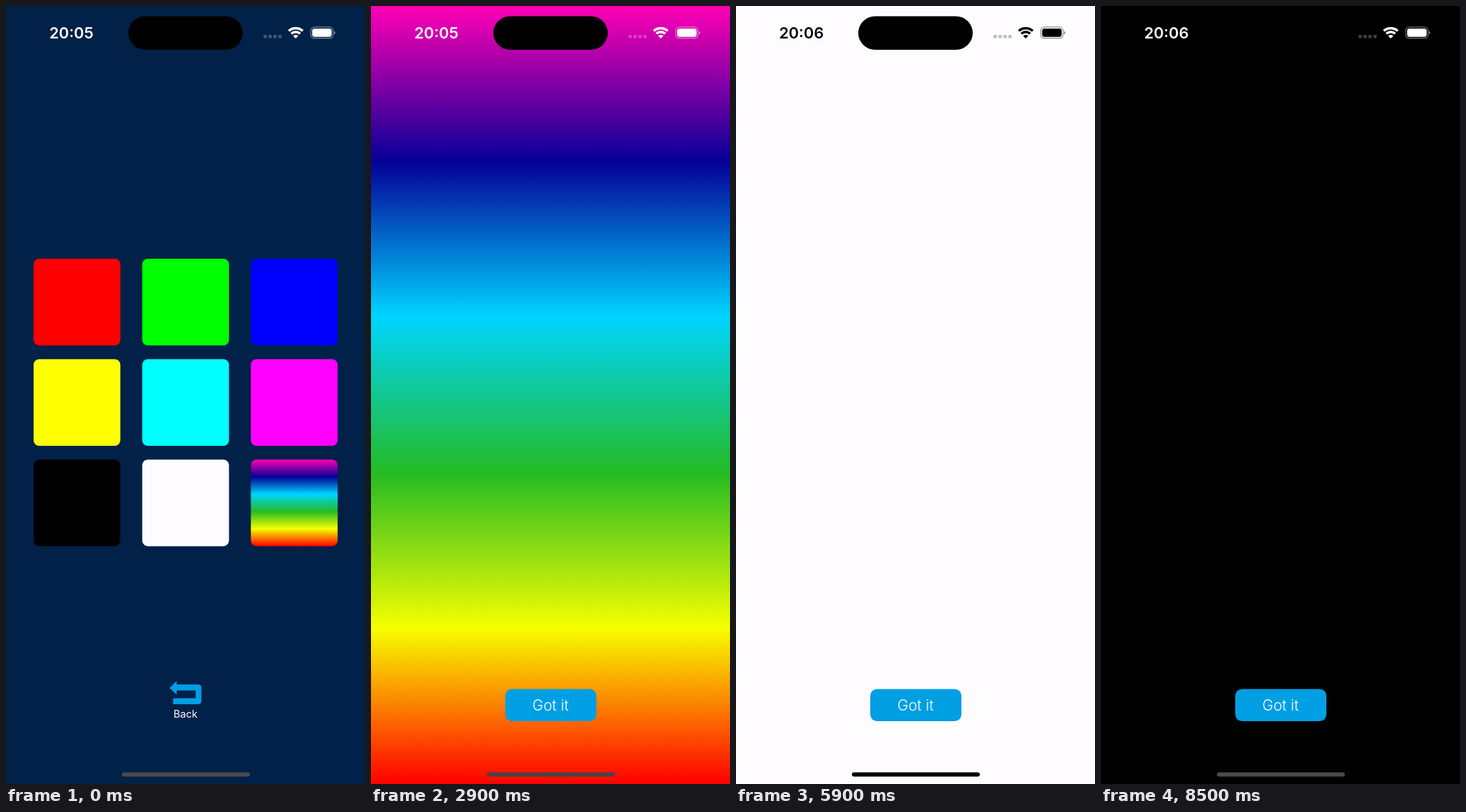
Recreate the animation shown at these times as an HTML page. Size 508 px wide and 1102 px high, loop 8.6 s.

```html
<!DOCTYPE html>
<html lang="en">
<head>
<meta charset="utf-8">
<title>Color screens</title>
<style>
  html, body { margin: 0; width: 100%; height: 100%; overflow: hidden; background: #022148; }
  svg { display: block; width: 100%; height: 100%; }
  text { font-family: Inter, sans-serif; text-anchor: middle; }
</style>
</head>
<body>
<svg viewBox="0 0 508 1102">
  <defs>
    <linearGradient id="rainbow" x1="0" y1="0" x2="0" y2="1">
      <stop offset="0" stop-color="#ff00b4"/>
      <stop offset=".2" stop-color="#050096"/>
      <stop offset=".4" stop-color="#00d5ff"/>
      <stop offset=".6" stop-color="#24bb24"/>
      <stop offset=".8" stop-color="#f7ff00"/>
      <stop offset="1" stop-color="#ff0000"/>
    </linearGradient>
  </defs>

  <rect width="508" height="1102" fill="#022148"/>
  <g id="tiles"></g>
  <path fill="#009fe3" d="M231.5 966 241.5 956V961H271.5Q276.5 961 276.5 966V984Q276.5 989 271.5 989H236.5V980.5H268.5V969.5H241.5V975.5Z"/>
  <text x="254" y="1008" font-size="14.6" fill="#fff">Back</text>

  <g id="sheet">
    <rect id="cover" width="508" height="1102"/>
    <rect x="190" y="967.5" width="129" height="45.5" rx="9.5" fill="#009fe3"/>
    <text x="254" y="998" font-size="21" font-weight="300" fill="#fff">Got it</text>
  </g>

  <rect x="173" y="14.5" width="162" height="47.5" rx="23.75"/>
  <g id="status">
    <text id="clock" x="92.5" y="46" font-size="21.8" font-weight="600"></text>
    <path opacity=".25" d="M364.5 41h4.4v4.4h-4.4zm7 0h4.4v4.4h-4.4zm7 0h4.4v4.4h-4.4zm7 0h4.4v4.4h-4.4z"/>
    <g id="wifi" fill="none" stroke-width="3.5">
      <path d="M400.1 35.3A14.6 14.6 0 0 1 419.9 35.3M403.8 39.3A9.1 9.1 0 0 1 416.2 39.3"/>
    </g>
    <path d="M410 46 406.4 42.4A5.1 5.1 0 0 1 413.6 42.4Z"/>
    <rect id="battery" x="431.2" y="29.9" width="31.6" height="15.8" rx="5" fill="none" stroke-width="1.2" opacity=".45"/>
    <rect x="433.2" y="31.9" width="27.6" height="11.8" rx="3.4"/>
    <path opacity=".5" d="M464.2 35.4Q466 36 466 37.8T464.2 40.2Z"/>
  </g>
  <rect id="home" x="164" y="1085.5" width="181" height="6" rx="3"/>
</svg>
<script>
const LOOP = 8600, STEP = 100, HEIGHT = 1102;
const GRID_HOME = '#4a4a4a';
const byId = id => document.getElementById(id);
const set = (id, attributes) => {
  for (const name in attributes) byId(id).setAttribute(name, attributes[name]);
};

const screens = [
  { fill: 'url(#rainbow)', show: 2320, hide: 3850, hideTime: 140,
    home: y => y > 350 ? '#1b1b1b' : '#454545' },
  { fill: '#fefcff', show: 4680, hide: 5950, hideTime: 350, home: () => '#000' },
  { fill: '#000', show: 7050, hide: LOOP, hideTime: 1, home: () => GRID_HOME }
];

const tileFills = ['red', 'lime', 'blue', 'yellow', 'cyan', 'magenta', '#000', '#fefcff', 'url(#rainbow)'];
byId('tiles').innerHTML = tileFills.map((fill, i) =>
  `<rect x="${39 + i % 3 * 153.75}" y="${358 + Math.floor(i / 3) * 142.2}" width="122.8" height="122.8" rx="8" fill="${fill}"/>`
).join('');

const clamp = v => Math.min(1, Math.max(0, v));
const bezier = (a, b, s) => 3 * a * s * (1 - s) ** 2 + 3 * b * s * s * (1 - s) + s ** 3;

// Fast start with a long settle, solved by bisection
function ease(x) {
  if (x <= 0 || x >= 1) return clamp(x);
  let low = 0, high = 1;
  for (let i = 0; i < 24; i++) {
    const mid = (low + high) / 2;
    if (bezier(.38, .125, mid) < x) low = mid; else high = mid;
  }
  return bezier(.7, 1, low);
}

function draw(t) {
  const screen = screens.find(s => t >= s.show && t < s.hide + s.hideTime);
  let y = HEIGHT;
  if (screen) {
    const shown = ease((t - screen.show) / 500) - ease((t - screen.hide) / screen.hideTime);
    y = HEIGHT * (1 - shown);
    set('cover', { fill: screen.fill });
  }
  set('sheet', { transform: `translate(0 ${y})` });
  set('home', { fill: screen && y < 1088 ? screen.home(y) : GRID_HOME });

  const dark = clamp((t - 5200) / 300) - clamp((t - 5950) / 200);
  const level = Math.round(255 * (1 - dark));
  const ink = `rgb(${level},${level},${level})`;
  set('status', { fill: ink });
  set('wifi', { stroke: ink });
  set('battery', { stroke: ink });
  byId('clock').textContent = t < 5300 ? '20:05' : '20:06';
}

const start = performance.now();
function tick() {
  const t = (performance.now() - start) % LOOP;
  draw(Math.floor(t / STEP) * STEP);
  requestAnimationFrame(tick);
}
tick();
</script>
</body>
</html>
```
